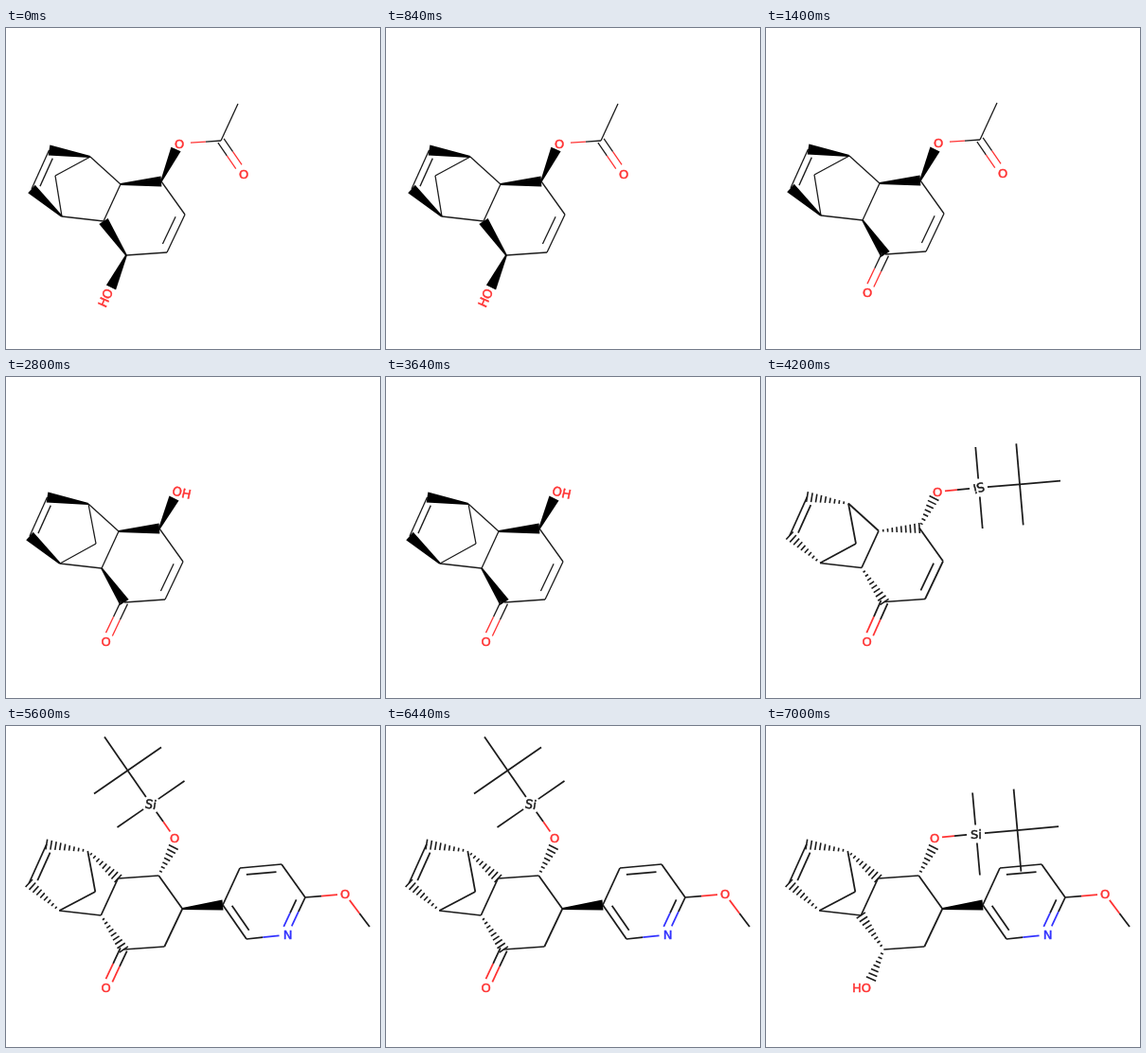
Write an HTML page with a canvas that moves like this. It is 395 px wide and 339 px high and loops after 8000 ms.

```html
<!DOCTYPE html>
<html lang="en">
<head>
<meta charset="utf-8">
<title>Reaction steps</title>
<style>
html, body { margin: 0; width: 100%; height: 100%; overflow: hidden; background: #fff; }
canvas { display: block; }
</style>
</head>
<body>
<canvas id="stage" width="395" height="339"></canvas>
<script>
const ctx = document.getElementById('stage').getContext('2d');
const RED = '#ff3333', BLUE = '#3333ff', INK = '#1c1c1c';
const LOOP = 8000, STEP = 1400;

// Ring skeleton shared by every step; T is where the oxygen bond ends
const CORE = {
  A: [43.5, 127], B: [87, 134], C: [119, 163], D: [101, 202], E: [57, 197], F: [25, 168],
  H: [162, 160], I: [187, 195], J: [168, 235], K: [125, 238], T: [177.5, 128]
};
let weight = 1.3;

const add = (p, q) => [p[0] + q[0], p[1] + q[1]];
const scale = (p, k) => [p[0] * k, p[1] * k];
const lerp = (p, q, t) => [p[0] + (q[0] - p[0]) * t, p[1] + (q[1] - p[1]) * t];
const dist = (p, q) => Math.hypot(q[0] - p[0], q[1] - p[1]);
const toward = (p, q, d) => lerp(p, q, d / dist(p, q));
const normal = (p, q) => {
  const d = dist(p, q);
  return [(p[1] - q[1]) / d, (q[0] - p[0]) / d];
};

function line(p, q, color = INK, width = weight) {
  ctx.strokeStyle = color;
  ctx.lineWidth = width;
  ctx.beginPath();
  ctx.moveTo(...p);
  ctx.lineTo(...q);
  ctx.stroke();
}

function path(...points) {
  for (let i = 1; i < points.length; i++) line(points[i - 1], points[i]);
}

// Bond from a carbon to a coloured atom, split at its middle
function hetero(p, atom, color, gap = 9) {
  const end = toward(atom, p, gap), mid = lerp(p, end, 0.5);
  line(p, mid);
  line(mid, end, color);
}

function carbonyl(p, o, gap = 8) {
  const n = normal(p, o);
  for (const side of [-3.8, 3.8]) {
    const shift = scale(n, side);
    hetero(add(p, shift), add(o, shift), RED, gap);
  }
}

function innerLine(p, q, side) {
  const shift = scale(normal(p, q), side);
  return [add(lerp(p, q, 0.14), shift), add(lerp(p, q, 0.86), shift)];
}

function double(p, q, side) {
  line(p, q);
  line(...innerLine(p, q, side));
}

function wedge(p, q) {
  const n = normal(p, q);
  ctx.fillStyle = '#000';
  ctx.beginPath();
  ctx.moveTo(...add(p, scale(n, 0.9)));
  ctx.lineTo(...add(q, scale(n, 5.6)));
  ctx.lineTo(...add(q, scale(n, -5.6)));
  ctx.lineTo(...add(p, scale(n, -0.9)));
  ctx.fill();
}

function hash(p, q) {
  const count = Math.round(dist(p, q) / 4.8), n = normal(p, q);
  for (let i = 1; i <= count; i++) {
    const t = i / count, c = lerp(p, q, t), w = scale(n, 0.8 + 4.7 * t);
    line(add(c, w), add(c, scale(w, -1)), INK, 1.6);
  }
}

function label(text, [x, y], color = RED, degrees = 0, size = 13) {
  ctx.save();
  ctx.translate(x, y);
  ctx.rotate(degrees * Math.PI / 180);
  ctx.font = `${size}px "DejaVu Sans", sans-serif`;
  ctx.textAlign = 'center';
  ctx.fillStyle = ctx.strokeStyle = color;
  ctx.lineWidth = 0.5;
  ctx.fillText(text, 0, size * 0.365);
  ctx.strokeText(text, 0, size * 0.365);
  ctx.restore();
}

function skeleton(dx, dy, bridge, stereo) {
  const m = {};
  for (const key in CORE) m[key] = add(CORE[key], [dx, dy]);
  m.T = add(CORE.T, [dx, 0]);
  const { A, B, C, D, E, F, H, I, J, K } = m;
  path(B, bridge, E, D, C);
  path(H, I);
  path(J, K);
  double(F, A, 7);
  stereo(B, A);
  stereo(E, F);
  stereo(H, m.T);
  return m;
}

function ester(dx, dy) {
  const shift = [dx, dy];
  const [o, c, methyl, oxo] = [[181, 120], [225, 117], [243, 78], [249, 152]].map(p => add(p, shift));
  hetero(c, o, RED, 12);
  line(c, methyl);
  carbonyl(c, oxo, 9);
  label('O', o);
  label('O', oxo);
}

function silyl(o, si, axis, degrees) {
  const side = [-axis[1], axis[0]], c = add(si, axis);
  hetero(toward(si, o, 10), o, RED, 8);
  line(toward(si, c, 9), c);
  for (const k of [-1, 1]) {
    const arm = scale(side, k), end = add(si, arm);
    line(toward(si, end, 9.5), end);
    line(c, add(c, arm));
  }
  line(c, add(c, axis));
  label('O', o);
  label('Si', si, INK, degrees);
}

function pyridine(from) {
  const p = [[229, 189], [247, 150], [291, 146], [316, 181]];
  const n = [297.5, 220.5], last = [254, 225], o = [358, 177.5], methyl = [384, 212];
  wedge(from, p[0]);
  path(...p);
  line(...innerLine(p[1], p[2], 7.5));
  double(last, p[0], 7.5);
  hetero(last, n, BLUE);
  hetero(p[3], n, BLUE, 10);
  const [start, end] = innerLine(p[3], n, 7.5), mid = lerp(start, end, 0.5);
  line(start, mid);
  line(mid, end, BLUE);
  hetero(p[3], o, RED, 8);
  hetero(methyl, o, RED, 8);
  label('N', n, BLUE);
  label('O', o);
}

function ketone(k, o) {
  carbonyl(k, o);
  label('O', o);
}

// Steps before the ring double bond is consumed
function enone(dx, dy, bridge, stereo) {
  const m = skeleton(dx, dy, bridge, stereo);
  line(m.B, m.C);
  stereo(m.C, m.H);
  double(m.I, m.J, 8);
  return m;
}

function adduct() {
  const m = skeleton(-0.7, -2, [94.3, 175], hash);
  hash(m.B, m.C);
  path(m.C, m.H);
  path(m.I, m.J);
  pyridine(m.I);
  return m;
}

const steps = [
  () => {
    const m = enone(2, 2, [52, 156], wedge);
    wedge(m.K, m.D);
    wedge(m.K, [111, 274]);
    ester(2, 2);
    label('HO', [105, 285], RED, -66);
  },
  () => {
    const m = enone(1, 1, [51, 155], wedge);
    wedge(m.D, m.K);
    ketone(m.K, [107, 279]);
    ester(1, 1);
  },
  () => {
    const m = enone(0, 0, [95, 176], wedge);
    wedge(m.D, m.K);
    ketone(m.K, [105.5, 279]);
    label('OH', [185.5, 122], RED, 13);
  },
  () => {
    const m = enone(0, -0.5, [95, 176], hash);
    hash(m.D, m.K);
    ketone(m.K, [106.5, 279]);
    silyl([181, 121], [225, 117], [43, -3.7], 166);
  },
  () => {
    const m = adduct();
    hash(m.D, m.K);
    ketone(m.K, [105.5, 276]);
    silyl([178, 118], [153, 82.5], [-24.5, -35.5], 10);
  },
  () => {
    const m = adduct();
    hash(m.K, m.D);
    hash(m.K, [111, 267]);
    silyl([178, 118], [222, 114], [43.5, -3.9], 0);
    label('HO', [101, 276]);
  }
];

function draw(elapsed) {
  const index = Math.floor((elapsed % LOOP) / STEP);
  weight = index < 3 ? 1.3 : 1.75;
  ctx.fillStyle = '#fff';
  ctx.fillRect(0, 0, 395, 339);
  steps[index]();
}

const begin = performance.now();
function tick() {
  draw(performance.now() - begin);
  requestAnimationFrame(tick);
}
tick();
</script>
</body>
</html>
```
